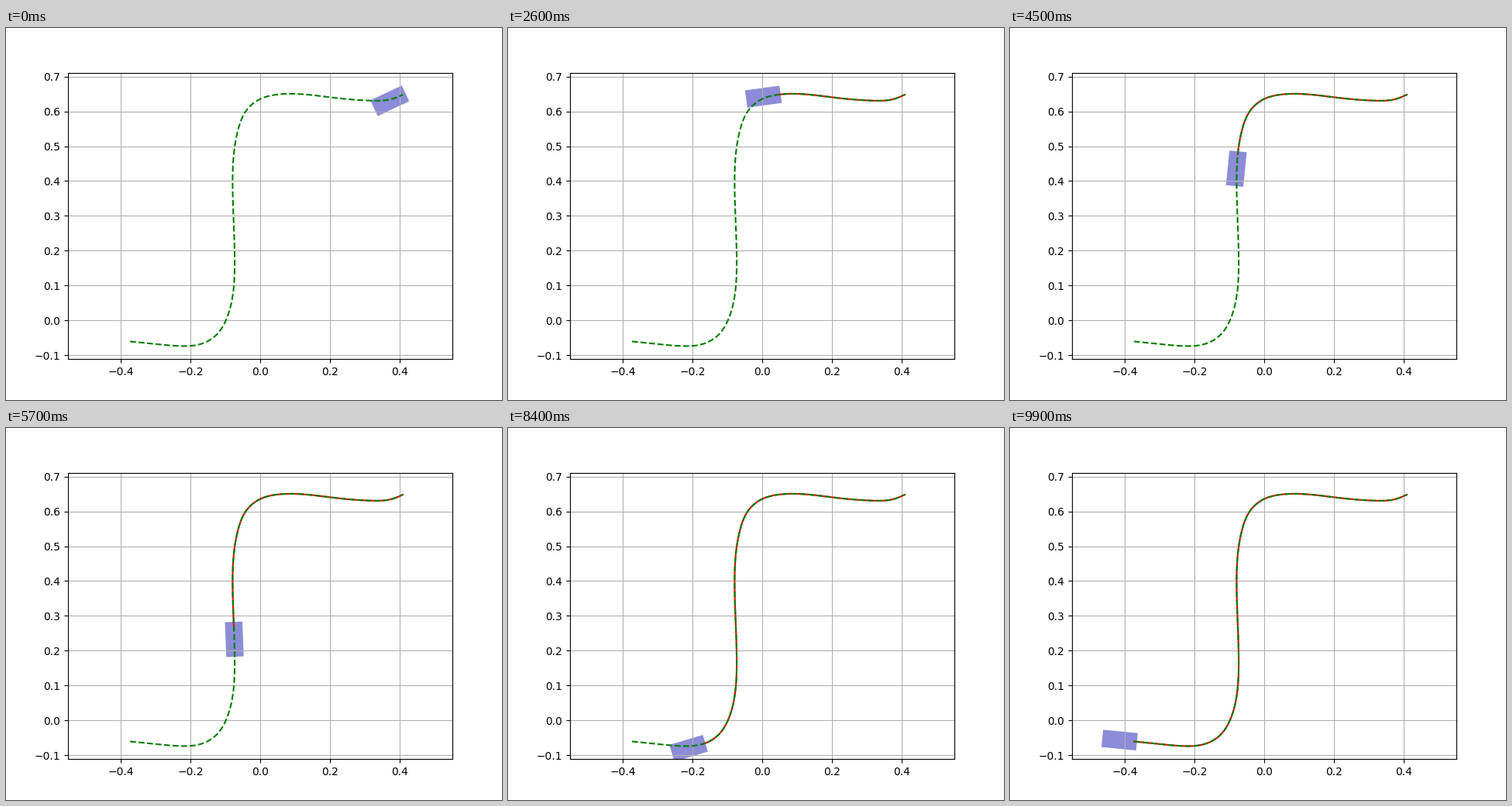
A matplotlib script that plays this animation: 640 px wide and 480 px high, repeating every 10 s.

```python
import numpy as np
import matplotlib.pyplot as plt
from matplotlib.animation import FuncAnimation
from matplotlib.patches import Polygon

FRAMES = 100
SCALE = 449.4             # pixels per data unit
ORIGIN = (328.0, 377.23)  # data origin on the stage
LENGTH, WIDTH, REAR = 0.1, 0.05, -0.0085

# Key points of the road on the stage, and the steps at which some are reached.
ROAD = [(512, 86), (498, 91.7), (472, 93.8), (420, 89.6), (365, 84.9),
        (348, 86.1), (328, 91.6), (310.5, 105.8), (299.8, 130), (293.9, 163),
        (292.4, 200), (293.9, 254), (295.1, 302), (290.7, 355.4),
        (284, 376.7), (272, 395.5), (251, 407.9), (226, 410.4),
        (192, 407.7), (160, 404.5)]
REACHED = {0: 0, 5: 26, 9: 45, 11: 57, 13: 71, 16: 84, 19: 99}


def spline(t, p):
    """Natural cubic spline through the points p at parameters t."""
    t, p = np.asarray(t, float), np.asarray(p, float).reshape(len(t), -1)
    n, h = len(t), np.diff(t)
    slope = np.diff(p, axis=0) / h[:, None]
    a, b = np.eye(n), np.zeros_like(p)
    for i in range(1, n - 1):
        a[i, i - 1:i + 2] = h[i - 1], 2 * (h[i - 1] + h[i]), h[i]
        b[i] = 6 * (slope[i] - slope[i - 1])
    m = np.linalg.solve(a, b)

    def at(q):
        k = np.clip(np.searchsorted(t, q, side="right") - 1, 0, n - 2)
        d, w = (q - t[k])[:, None], h[k][:, None]
        return (p[k] + d * (slope[k] - w * (2 * m[k] + m[k + 1]) / 6)
                + d**2 * m[k] / 2 + d**3 * (m[k + 1] - m[k]) / (6 * w))

    return at


knots = (np.array(ROAD) - ORIGIN) * (1, -1) / SCALE
dist = np.r_[0, np.cumsum(np.hypot(*np.diff(knots, axis=0).T))]
road = spline(dist, knots)
travel = spline(list(REACHED.values()), dist[list(REACHED)])(np.arange(FRAMES))[:, 0]

path = road(travel)
heading = road(travel + 0.002) - road(travel - 0.002)
heading /= np.hypot(*heading.T)[:, None]


def car_corners(i):
    f = heading[i]
    side = np.array([-f[1], f[0]]) * WIDTH / 2
    back, front = path[i] + f * REAR, path[i] + f * (REAR + LENGTH)
    return [back - side, front - side, front + side, back + side]


fig, ax = plt.subplots(figsize=(6.4, 4.8), dpi=100)
ax.set_xlim(-0.5518, 0.5518)
ax.set_ylim(-0.1112, 0.7112)
ax.grid(True)

car = ax.add_patch(Polygon(car_corners(0), facecolor=(0.1, 0.1, 0.7),
                           edgecolor="none", alpha=0.5))
trail, = ax.plot([], [], "r-")
ax.plot(*path[::-1].T, "g--")


def update(i):
    car.set_xy(car_corners(i))
    trail.set_data(*path[:i + 1].T)
    return car, trail


anim = FuncAnimation(fig, update, frames=FRAMES, interval=100,
                     repeat=True, repeat_delay=0)
plt.show()
```
